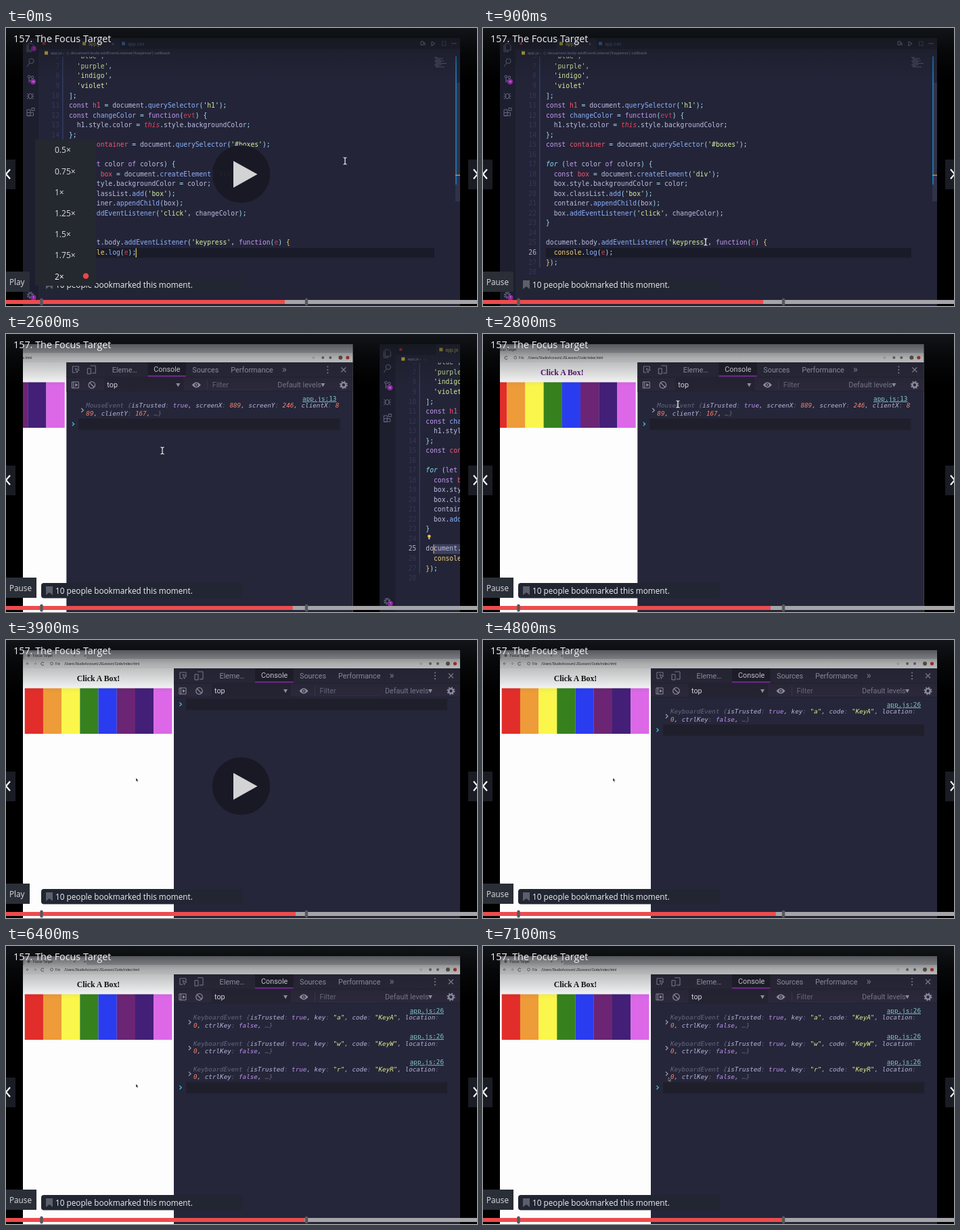
An HTML page that plays this animation: 696 by 412 pixels, repeating every 7.2 s.

```html
<!DOCTYPE html>
<html lang="en">
<head>
<meta charset="utf-8">
<title>Lesson player</title>
<style>
html, body { margin: 0; width: 100%; height: 100%; overflow: hidden; background: #000; }
svg { display: block; width: 696px; height: 412px; }
text { white-space: pre; }
.mono { font-family: "DejaVu Sans Mono", monospace; }
.ui { font-family: "Open Sans", "Noto Sans", sans-serif; }
.tool { font-family: Roboto, "Liberation Sans", sans-serif; }
.serif { font-family: "Liberation Serif", serif; }
</style>
</head>
<body>
<svg id="stage" viewBox="0 0 696 412" xmlns="http://www.w3.org/2000/svg"></svg>
<script>
const LOOP = 7200;
const PLAY_AT = 520, RELOAD_AT = 3100, PAUSE_AT = 3350, RESUME_AT = 4000;
const SELECT_AT = 1500, DROP_AT = 2300;
const KEY_TIMES = [4800, 5950, 6350];

// ---- markup helpers ----
const rect = (x, y, w, h, fill, more = '') =>
  `<rect x="${x}" y="${y}" width="${w}" height="${h}" fill="${fill}" ${more}/>`;
const dot = (x, y, r, fill, more = '') => `<circle cx="${x}" cy="${y}" r="${r}" fill="${fill}" ${more}/>`;
const line = (d, color, w = 1, more = '') =>
  `<path d="${d}" fill="none" stroke="${color}" stroke-width="${w}" ${more}/>`;
const text = (x, y, s, size, fill, cls = 'ui', more = '') =>
  `<text x="${x}" y="${y + size * 0.36}" font-size="${size}" fill="${fill}" class="${cls}" ${more}>${s}</text>`;
const group = (id, body, more = '') => `<g id="${id}" ${more}>${body}</g>`;

// Colours each match by the index of the capture group that caught it
const paint = (s, re, styles) => s.replace(re, (m, ...caught) => {
  const i = styles.findIndex((_, k) => caught[k] !== undefined);
  return i < 0 ? m : `<tspan ${styles[i]}>${m}</tspan>`;
});

// ---- editor ----
const CODE = [
  "  'blue',", "  'purple',", "  'indigo',", "  'violet'", "];",
  "const h1 = document.querySelector('h1');",
  "const changeColor = function(evt) {",
  "  h1.style.color = this.style.backgroundColor;",
  "};",
  "const container = document.querySelector('#boxes');",
  "",
  "for (let color of colors) {",
  "  const box = document.createElement('div');",
  "  box.style.backgroundColor = color;",
  "  box.classList.add('box');",
  "  container.appendChild(box);",
  "  box.addEventListener('click', changeColor);",
  "}",
  "",
  "document.body.addEventListener('keypress', function(e) {",
  "  console.log(e);",
  "});",
  ""
];
const CODE_RE = /('[^']*')|(\b(?:const|function|let|of)\b)|(\bfor\b)|(\bthis\b)|((?<=const )(?:h1|container|box)\b)|(\b(?:evt|e)\b)|((?<=\.)\w+(?=\()|(?<=const )changeColor)|((?<=\(e\) ){|}(?=\))|\bconsole\b)|([{}\[\]()=;,.])/g;
const CODE_STYLES = [
  'fill="#d6f0a0"', 'fill="#c49af2"', 'fill="#86dcf4" font-style="italic"',
  'fill="#f0405c" font-style="italic"', 'fill="#f2566c"', 'fill="#c8405a"', 'fill="#8db2fb"',
  'fill="#f3d272"', 'fill="#a2dcf4"'
];
const rowY = n => 318 + (n - 25) * 14.53;

function editor() {
  let s = rect(25, 15, 646, 397, '#232438') + rect(25, 15, 23, 397, '#1d1e2e');
  s += rect(48, 15, 623, 16, '#1c1d2c') + rect(108, 15, 60, 16, '#242539');
  s += group('rowBar', rect(93, 326, 540, 14.5, '#1a1b29'));
  s += group('select', rect(0, 311.5, 1, 14.5, '#3e405c', 'id="selectBox"'));
  s += rect(83, 42, 1.6, 313, '#2f3c62');
  CODE.forEach((row, i) => {
    const n = i + 6, y = rowY(n);
    s += text(79, y, n, 9.7, '#35375a', 'mono', `text-anchor="end" id="num${n}"`);
    s += text(93, y, paint(row, CODE_RE, CODE_STYLES), 9.7, '#bcbfe0', 'mono');
  });
  s += rect(191.6, 326.5, 1.2, 13.5, '#f2d34a', 'id="caret"');
  s += rect(104, 312, 1.2, 13.5, '#f2a53a', 'id="dragCaret"');
  s += group('bulb', dot(98, 299.8, 2.3, '#f7c843') + rect(97, 302.2, 2, 2, '#d8d8d8'));

  s += rect(48, 31, 623, 11.5, '#232438');
  s += rect(54, 21, 4, 4, '#b8363f') + rect(113, 20.5, 5, 5, '#d8c53a') + rect(171, 20.5, 5, 5, '#3a76c4');
  s += text(122, 23, 'app.js', 7, '#d8c55a', 'tool') + text(156, 23, '×', 7, '#8a8ca8', 'tool');
  s += text(180, 23, 'app.css', 7, '#4b6ea8', 'tool');
  s += rect(57, 34.5, 5, 5, '#cdbb3a');
  const crumb = (id, tail) => text(66, 37, 'app.js ›  ' + tail, 6.2, '#8184a6', 'tool', `id="${id}"`);
  s += crumb('crumbLong', "◇ document.body.addEventListener('keypress') callback") + crumb('crumbShort', '...');
  s += line('M613 20h4v5h-4zM617 22h2v4', '#9a9cb4', .9) + line('M629 20l5 3-5 3.5z', '#9a9cb4', .9);
  s += rect(644.5, 20, 5.5, 6, 'none', 'stroke="#55576f" stroke-width=".9"');
  s += [659.5, 662, 664.5].map(x => dot(x, 23, .8, '#9a9cb4')).join('');
  for (let i = 0; i < 9; i++)
    s += rect(633 + (i % 3), 43 + i * 1.8, 5 + (i * 7) % 12, .8, '#7a7da0', 'opacity=".7"');
  s += rect(664, 81, 7, 176, '#303249') + rect(664, 42, 2, 190, '#1c6fa9');
  s += rect(664, 217.5, 7, 1.4, '#b5a04a', 'id="markA"') + rect(664, 210.5, 7, 1.4, '#a04a55', 'id="markB"');

  const ink = '#676982';
  s += line('M33 23h5l3 3v7h-8zM31 25v10h7', ink);
  s += dot(37.5, 49, 3.6, 'none', `stroke="${ink}"`) + line('M35 52l-4 5', ink);
  s += dot(34, 72, 1.8, 'none', `stroke="${ink}"`) + dot(39, 73, 1.8, 'none', `stroke="${ink}"`);
  s += line('M34 74v7M39 75q0 3-5 3', ink) + dot(40, 79.5, 4.2, '#8a259f') + text(38, 79.5, '10', 3.6, '#ddd', 'tool');
  s += `<ellipse cx="36" cy="101" rx="2.8" ry="3.8" fill="none" stroke="${ink}"/>`;
  s += line('M31 97l3 2M41 97l-3 2M30.5 101h3M38.5 101h3M31 105l3-2M41 105l-3-2', ink);
  s += line('M31 121h5v9h-5zM31 125.5h9.5v4.5h-9.5M38 118.5h4v4h-4z', ink);
  s += dot(36, 396, 4, 'none', `stroke="${ink}" stroke-width="2" stroke-dasharray="2 1.1"`) + dot(36, 396, 2.4, 'none', `stroke="${ink}"`);
  s += dot(40.5, 399.5, 4, '#8a259f') + text(39.4, 399.5, '1', 4.5, '#ddd', 'tool');
  s += group('unsaved', dot(41, 30.5, 4, '#8a259f') + text(39.9, 30.5, '1', 4.5, '#ddd', 'tool'));
  return s;
}

// ---- browser ----
const BOXES = ['#e12e2a', '#ee9b39', '#fbf64b', '#36811e', '#2a3cf0', '#6c2474', '#431f78', '#dc68e8'];
const LOG_RE = /("[^"]*")|\b(true|false)\b|(\b\d+\b)|(\b\w+(?=:)|,)/g;
const LOG_STYLES = ['fill="#e8ef8c"', 'fill="#bd90ee"', 'fill="#f7816b"', 'fill="#b7b3dc"'];

function logEntry(id, i, row, first, second) {
  const y = 95.6 + i * 38.2;
  const put = (dy, s) => text(277, y + dy, paint(s, LOG_RE, LOG_STYLES), 9.28, '#66677f', 'mono', 'font-style="italic"');
  return group(id,
    text(647, y, 'app.js:' + row, 9.28, '#86c8cf', 'mono', 'text-anchor="end" text-decoration="underline"') +
    line(`M270 ${y + 14.4}l3 3-3 3`, '#9a9bb0', 1.3) + put(10.5, first) + put(21.7, second));
}

function browser() {
  let s = rect(25, 15, 646, 397, '#fdfdfd');
  s += rect(25, 15, 646, 13, '#c9cbce') + rect(27, 17, 92, 11, '#f1f1f1') + rect(25, 28, 646, 14, '#f3f3f3');
  s += text(40, 23, 'Focus Target', 5, '#333', 'tool') + text(100, 23, '×', 5, '#444', 'tool') + text(115, 23, '+', 6, '#444', 'tool');
  s += dot(33.5, 23, 2, '#777');
  s += line('M34 35h-4m2-2l-2 2 2 2', '#777', .8) + line('M41 35h4m-2-2l2 2-2 2', '#aaa', .8);
  s += line('M56 34a2.3 2.3 0 1 0 0 2.5', '#555', .9) + dot(67.5, 35, 2, 'none', 'stroke="#555" stroke-width=".7"');
  s += text(72.5, 35, 'File', 4.9, '#444', 'tool') + text(86, 35, '/Users/StudioAccount/JSLesson/Code/index.html', 4.95, '#222', 'tool');
  s += text(610.5, 35, '☆', 6, '#555', 'tool') + dot(627, 35, 2, '#777') + dot(638, 35, 2, '#777');
  s += dot(653, 35, 3, '#6f6250') + dot(663.5, 35, 2.6, '#d3382f');

  s += text(136.5, 56.5, 'Click A Box!', 11.8, '#111', 'serif', 'id="heading" font-weight="bold" text-anchor="middle"');
  BOXES.forEach((c, i) => s += rect(27.7 + i * 27.2, 71.5, 27.3, 67.5, c));

  s += rect(248, 42, 423, 370, '#252639') + rect(248, 42, 423, 43, '#2a2839');
  s += rect(368, 42, 56.5, 21.5, '#1f1d2b') + rect(368, 61.5, 56.5, 2, '#8c2fae') + rect(248, 63.5, 423, .8, '#1e1e2b');
  s += rect(304, 65, 117, 19, '#242332') + rect(248, 84.5, 423, .8, '#1e1e2b');
  const ink = '#8f8fa3';
  s += line('M266 52v-4h-9v9h4', ink) + line('M261 51l6 2.5-2.5 1-1 3z', ink, 1, 'stroke-linejoin="round"');
  s += line('M283 47h8v11h-5M279 51h5v8h-5z', ink);
  const label = (x, y, v, c = '#a5a3b8') => text(x, y, v, 10.8, c, 'tool');
  s += label(315.5, 53, 'Eleme…') + label(377, 52.5, 'Console', '#e8e6f2') + label(434, 53, 'Sources') + label(491, 53, 'Performance');
  s += text(566.5, 52, '»', 15, ink, 'tool') + [48.5, 53, 57.5].map(y => dot(634, y, 1.1, ink)).join('');
  s += line('M654 49.5l7 7m0-7l-7 7', ink, 1.2);
  s += line('M256 71h10v9h-10zM258.5 71v9', ink) + `<path d="M261 73l4 2.5-4 2.5z" fill="${ink}"/>`;
  s += dot(285.5, 75.5, 4.8, 'none', `stroke="${ink}" stroke-width="1.2"`) + line('M282 72l7 7', ink, 1.2);
  s += label(308, 75.5, 'top', '#d5d3e2') + `<path d="M410 73h6l-3 5.5z" fill="${ink}"/>`;
  s += `<path d="M433.5 75.5q6.5-8 13 0q-6.5 8-13 0z" fill="${ink}"/>` + dot(440, 75.5, 2.5, '#2a2839') + dot(440, 75.5, 1.2, ink);
  s += rect(456, 68, .8, 14, '#3c3b4e') + label(463.5, 75.5, 'Filter', '#68677c') + rect(462, 82, 89, .6, '#33324a');
  s += label(560, 75.5, 'Default levels', '#77758c') + `<path d="M624 73h6l-3 5.5z" fill="${ink}"/>`;
  s += dot(657.5, 75.5, 3.4, 'none', `stroke="${ink}" stroke-width="2.4"`);
  s += dot(657.5, 75.5, 5.2, 'none', `stroke="${ink}" stroke-width="1.6" stroke-dasharray="2 2.08"`);

  s += logEntry('mouseLog', 0, 13, 'MouseEvent {isTrusted: true, screenX: 889, screenY: 246, clientX: 8', '89, clientY: 167, …}');
  ['a', 'w', 'r'].forEach((k, i) => s += logEntry('log' + i, i, 26,
    `KeyboardEvent {isTrusted: true, key: "${k}", code: "Key${k.toUpperCase()}", location:`, '0, ctrlKey: false, …}'));
  s += group('prompt', rect(266, 87, 386, 17, '#1f1f2c') + line('M256.5 92.5l2.8 2.7-2.8 2.7', '#3fb3cf', 1.4));
  return s;
}

// ---- player controls ----
function player() {
  let s = rect(0, 0, 696, 78, 'url(#shade)');
  s += text(11, 15.5, '157. The Focus Target', 14.35, '#f2f2f4');
  s += rect(0, 195, 14, 44, '#1a1c24') + line('M6 209.5l-6 7 6 7', '#fff', 2.2);
  s += rect(683, 195, 13, 44, '#1a1c24') + line('M691 209.5l6 7-6 7', '#fff', 2.2);
  s += rect(52, 369, 298, 22.5, '#212632', 'rx="4"');
  s += '<path d="M59 374h10v13l-5-4-5 4z" fill="#5c606c"/>';
  s += text(73, 381, '10 people bookmarked this moment.', 11.75, '#f0f0f2');
  s += rect(0, 403, 696, 6, '#a5a5a9') + rect(0, 403, 412, 6, '#ec4c4e', 'id="bar"');
  s += [52.5, 444].map(x => rect(x - 2.2, 400.5, 4.4, 11, '#55585f', 'rx="2"')).join('');

  const speeds = ['0.5', '0.75', '1', '1.25', '1.5', '1.75', '2'];
  let menu = rect(43, 165, 90, 217, '#24282f');
  speeds.forEach((v, i) => menu += text(72, 181 + i * 31.2, v + '×', 12, i === 6 ? '#fff' : '#dcdde0'));
  s += group('menu', menu + dot(118, 367.5, 4.2, '#ec4448'));
  s += group('bigPlay', dot(347.5, 216.5, 42.7, '#181923', 'opacity=".95"') +
    '<path d="M336 197l35.5 19.8-35.5 20z" fill="#d3d3d6"/>');
  s += rect(0, 361, 45, 30, '#2a2e37', 'id="tipBox"') + text(5, 376.5, 'Pause', 11.75, '#dcdde1', 'ui', 'id="tip"');
  return s;
}

const stage = document.getElementById('stage');
stage.innerHTML = `<defs>
  <clipPath id="screen"><rect x="25" y="15" width="646" height="397"/></clipPath>
  <linearGradient id="shade" x1="0" y1="0" x2="0" y2="1">
    <stop offset="0" stop-color="#14171c" stop-opacity=".88"/>
    <stop offset=".45" stop-color="#14171c" stop-opacity=".32"/>
    <stop offset="1" stop-color="#14171c" stop-opacity="0"/>
  </linearGradient></defs>` +
  rect(0, 0, 696, 412, '#000') +
  `<g clip-path="url(#screen)">${group('editor', editor())}${group('browser', browser())}` +
  group('beam', line('M-2.5-5q2.5 0 2.5 1.5q0-1.5 2.5-1.5M0-4v8M-2.5 5q2.5 0 2.5-1.5q0 1.5 2.5 1.5', '#f0f0f4', 1.2)) +
  group('arrow', '<path d="M0 0v5l1.2-1 .9 2 .9-.4-.9-1.9h1.6z" fill="#111" stroke="#fff" stroke-width=".4"/>') +
  '</g>' + player();

// ---- motion ----
const el = {};
stage.querySelectorAll('[id]').forEach(e => el[e.id] = e);
const show = (id, on) => el[id].setAttribute('visibility', on ? 'visible' : 'hidden');
const move = (id, x, y) => el[id].setAttribute('transform', `translate(${x.toFixed(2)} ${y.toFixed(2)})`);
const smooth = p => p * p * (3 - 2 * p);
const easeOut = p => 1 - (1 - p) ** 3;
const span = (t, a, b) => Math.min(1, Math.max(0, (t - a) / (b - a)));

function track(keys, t, ease = p => p) {
  let i = 0;
  while (i < keys.length - 2 && t > keys[i + 1][0]) i++;
  const [a, b] = [keys[i], keys[i + 1]], p = ease(span(t, a[0], b[0]));
  return a.slice(1).map((v, k) => v + (b[k + 1] - v) * p);
}

const MOUSE = [
  [0, 501, 197], [PLAY_AT, 501, 197], [880, 329, 317], [1050, 329, 317], [SELECT_AT, 175, 321],
  [1900, 106, 324], [2350, 106, 324], [2750, 288, 104], [2850, 288, 104], [3250, 192, 204.5],
  [6550, 192, 204.5], [7050, 274, 195], [LOOP, 274, 195]
];
const BAR = [
  [0, 412], [PLAY_AT, 412], [900, 414], [2000, 420], [2800, 425], [PAUSE_AT, 428],
  [RESUME_AT, 428], [5700, 438], [7100, 444], [LOOP, 444.4]
];

function draw(t) {
  const paused = t < PLAY_AT || (t >= PAUSE_AT && t < RESUME_AT);
  show('menu', t < 420);
  show('bigPlay', paused);
  el.tip.textContent = paused ? 'Play' : 'Pause';
  el.tipBox.setAttribute('width', paused ? 35 : 45);
  el.bar.setAttribute('width', track(BAR, t)[0]);

  // Desktop swipe from editor to browser
  const slide = -686 * (1 - easeOut(span(t, 2350, 3000)));
  move('browser', slide, 0);
  move('editor', slide + 686, 0);

  const [mx, my] = track(MOUSE, t, smooth);
  const arrow = t >= 3000;
  move('beam', mx, my);
  move('arrow', mx, my);
  show('beam', !arrow);
  show('arrow', arrow);

  // Selection follows the pointer in whole letters until it is released
  const picked = t >= SELECT_AT;
  const dragX = track(MOUSE, Math.min(t, DROP_AT), smooth)[0];
  const edge = Math.min(174.8, 93 + Math.round((dragX - 93) / 5.84) * 5.84);
  el.selectBox.setAttribute('x', edge);
  el.selectBox.setAttribute('width', 174.8 - edge);
  el.dragCaret.setAttribute('x', edge - .6);
  ['select', 'dragCaret', 'crumbShort', 'markB'].forEach(id => show(id, picked));
  ['rowBar', 'crumbLong', 'markA'].forEach(id => show(id, !picked));
  show('unsaved', t < 700);
  show('caret', !picked && (t < PLAY_AT || Math.floor((t - PLAY_AT) / 265) % 2 === 0));
  show('bulb', t >= 1900);
  el.num25.setAttribute('fill', picked ? '#b3b4cc' : '#35375a');
  el.num26.setAttribute('fill', picked ? '#35375a' : '#b3b4cc');

  const fresh = t >= RELOAD_AT;
  el.heading.setAttribute('fill', fresh ? '#111' : '#5a1474');
  show('mouseLog', !fresh);
  KEY_TIMES.forEach((at, i) => show('log' + i, t >= at));
  const rows = fresh ? KEY_TIMES.filter(at => t >= at).length : 1;
  move('prompt', 0, rows * 38.2);
}

const start = performance.now();
function tick() {
  draw((performance.now() - start) % LOOP);
  requestAnimationFrame(tick);
}
tick();
</script>
</body>
</html>
```
